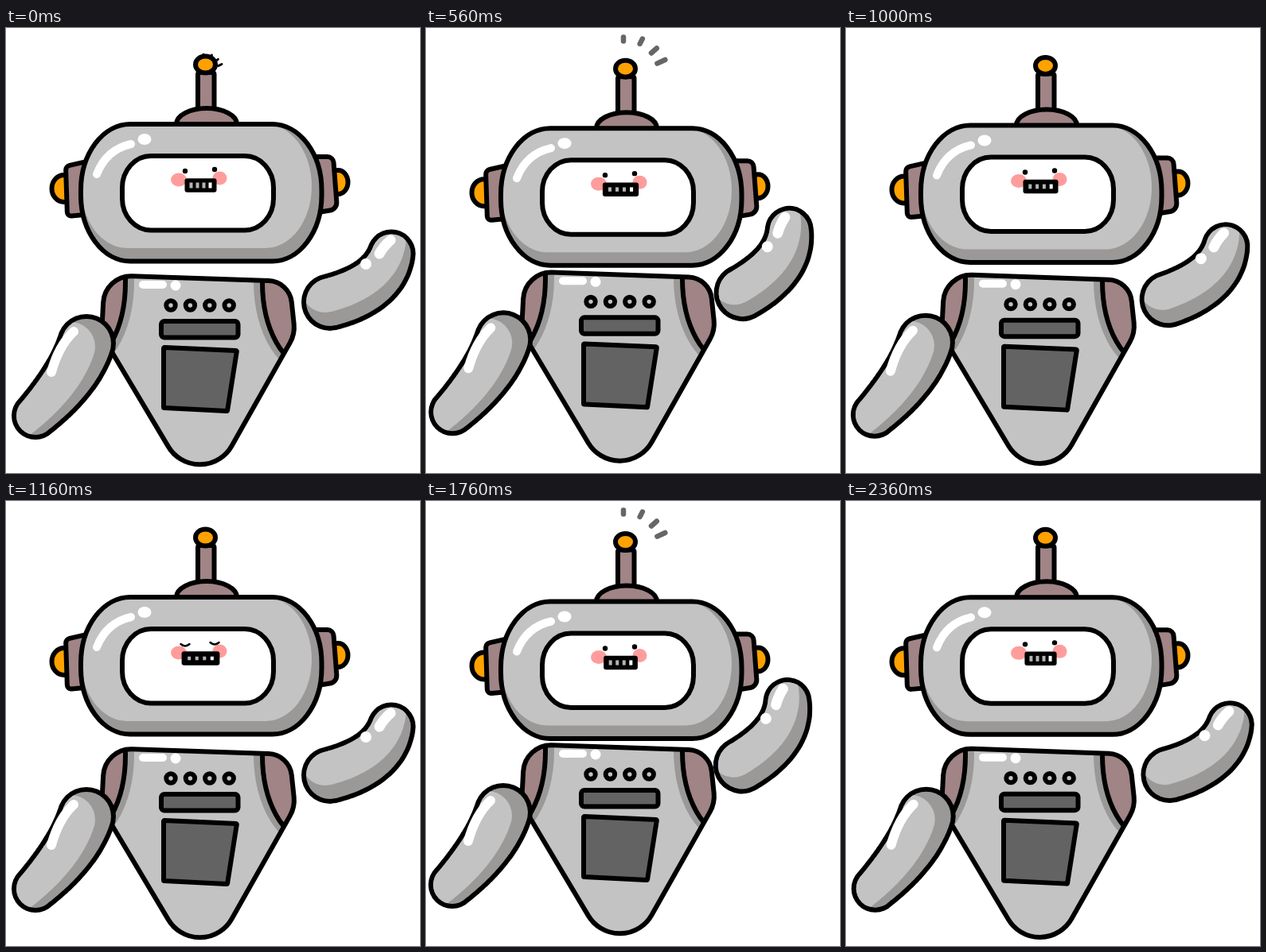
An HTML page with a canvas that plays this animation: 520x560 px, repeating every 2400 ms.

```html
<!DOCTYPE html>
<html lang="en">
<head>
<meta charset="utf-8">
<title>Waving robot</title>
<style>
html, body { margin: 0; width: 100%; height: 100%; overflow: hidden; background: #fff; }
canvas { display: block; }
</style>
</head>
<body>
<canvas id="stage" width="520" height="560"></canvas>
<script>
const ctx = document.getElementById('stage').getContext('2d');
const LOOP = 2400, STEP = 40;
const INK = '#000', LIGHT = '#c3c3c3', DARK = '#9b9898', MAUVE = '#a08486',
  ORANGE = '#ffa200', PANEL = '#636363', PINK = '#ff9c9c', WHITE = '#fff';

function oval(x, y, rx, ry = rx) {
  const path = new Path2D();
  path.ellipse(x, y, rx, ry, 0, 0, 2 * Math.PI);
  return path;
}

function box(x, y, w, h, rx, ry = rx) {
  const path = new Path2D();
  path.roundRect(x, y, w, h, { x: rx, y: ry });
  return path;
}

// Polygon of [x, y, corner radius].
function rounded(...corners) {
  const path = new Path2D(), [first] = corners, last = corners.at(-1);
  path.moveTo((first[0] + last[0]) / 2, (first[1] + last[1]) / 2);
  corners.forEach(([x, y, r], i) => {
    const [nx, ny] = corners[(i + 1) % corners.length];
    path.arcTo(x, y, nx, ny, r);
  });
  path.closePath();
  return path;
}

// Circles swept along a quadratic bend, narrowing towards the end.
function limb([ax, ay], [bx, by], [cx, cy], fromR, toR) {
  const path = new Path2D();
  for (let i = 0; i <= 60; i++) {
    const t = i / 60, u = 1 - t;
    const bend = (a, b, c) => u * u * a + 2 * u * t * b + t * t * c;
    path.addPath(oval(bend(ax, bx, cx), bend(ay, by, cy), fromR + (toR - fromR) * t * t));
  }
  return path;
}

function fill(path, color) {
  ctx.fillStyle = color;
  ctx.fill(path);
}

function line(path, width = 6, color = INK) {
  ctx.strokeStyle = color;
  ctx.lineWidth = width;
  ctx.stroke(path);
}

function part(path, color) {
  fill(path, color);
  line(path);
}

function group(draw) {
  ctx.save();
  draw();
  ctx.restore();
}

const shine = (d, width) => line(new Path2D(d), width, WHITE);

function drawRays(t) {
  const phase = t % 1200;
  const alpha = Math.min(1, (680 - phase) / 200);
  if (alpha <= 0) return;
  group(() => {
    const size = 0.44 + phase / 1000;
    ctx.globalAlpha = alpha;
    ctx.translate(248, 50);
    ctx.scale(size, size);
    for (let i = 0; i < 4; i++) {
      const angle = 0.65 * i - 0.06 * i * i, distance = 36 + 4 * i, half = 2.5 + i;
      const x = distance * Math.sin(angle), y = -distance * Math.cos(angle);
      const dx = half * Math.sin(0.8 * angle), dy = -half * Math.cos(0.8 * angle);
      line(new Path2D(`M${x - dx} ${y - dy}L${x + dx} ${y + dy}`), 6.5);
    }
  });
}

function drawMouth(t) {
  const open = (1 - Math.cos(t / 800 * 2 * Math.PI)) / 2;
  const w = 40 + 8 * open, h = 17.5, toothH = 7 - 2.5 * open;
  fill(box(244.5 - w / 2, 198 - h / 2, w, h, 3), INK);
  for (let i = 0; i < 4; i++) {
    ctx.fillStyle = i === 3 ? WHITE : '#b4b4b4';
    ctx.fillRect(244.5 + (i - 1.5) * w * 0.2 - 2, 198 - toothH / 2, 4, toothH);
  }
}

function drawFace(t) {
  const blinking = t >= 1100 && t < 1270;
  fill(oval(217, 191, 10, 8.5), PINK);
  fill(oval(268.5, 189, 9, 8.5), PINK);
  for (const [x, y] of [[225, 180], [262, 178]]) {
    if (blinking) line(new Path2D(`M${x - 5.5} ${y}q5.5 5 11 0`), 2.5);
    else fill(oval(x, y, 3.2), INK);
  }
  drawMouth(t);
}

function drawHead(t) {
  part(oval(73, 202, 15.5, 17), ORANGE);
  part(rounded([110, 166, 4], [75, 174, 6], [77, 237, 5], [110, 234, 4]), MAUVE);
  part(oval(417, 194, 12.5, 15), ORANGE);
  part(rounded([380, 162, 4], [411, 162, 8], [416, 228, 10], [380, 234, 4]), MAUVE);

  part(box(241, 56, 20.5, 46, 2), MAUVE);
  part(oval(250.5, 46, 12.5, 10.5), ORANGE);
  part(oval(252, 121, 38, 20), MAUVE);

  const shell = box(94, 121, 302.5, 172.5, 62, 83);
  fill(shell, DARK);
  group(() => {
    ctx.clip(shell);
    fill(box(94, 121, 290, 156, 58, 78), LIGHT);
  });
  line(shell);
  shine('M114 184Q126 153 157 146', 10);
  fill(oval(174, 140, 8.5, 7), WHITE);
  part(box(146, 161, 190, 93.5, 36, 40), WHITE);
  drawFace(t);
}

function drawBody() {
  const shell = rounded([124, 311, 35], [356, 319, 30], [363, 385, 40], [244.5, 595, 46], [120, 386, 30]);
  fill(shell, LIGHT);
  group(() => {
    ctx.clip(shell);
    for (const x of [90, 382]) {
      fill(oval(x, 320, 71, 116), DARK);
      part(oval(x, 320, 60, 107), MAUVE);
    }
  });
  line(shell);
  shine('M172 323H197', 10);
  fill(oval(213, 324, 6.5), WHITE);
  for (let i = 0; i < 4; i++) line(oval(207 + 24.4 * i, 349, 5.7), 6);
  part(box(195, 369, 96.5, 20.5, 4), PANEL);
  part(rounded([198, 402, 1], [290, 406, 1], [278, 482, 1], [198, 478, 1]), PANEL);
}

function drawArm(from, bend, to, fromR, toR, shadeX, shadeY) {
  const inner = limb(from, bend, to, fromR - 3, toR - 3);
  fill(limb(from, bend, to, fromR + 3, toR + 3), INK);
  fill(inner, DARK);
  ctx.save();
  ctx.clip(inner);
  ctx.translate(shadeX, shadeY);
  fill(inner, LIGHT);
  ctx.restore();
}

function drawLeftArm() {
  drawArm([101, 397], [87, 440], [37, 488], 34, 27, -20, 4);
  shine('M85 382Q66 400 57 433', 12);
}

function drawRightArm() {
  drawArm([407, 345], [473, 328], [484, 284], 33, 27.5, -6, -17);
  shine('M483 267Q474 275 469 284', 13);
  fill(oval(452, 297, 7), WHITE);
}

// Linear swing away from rest and back, twice per loop.
const swing = t => Math.min(t, Math.abs(t - 1160), LOOP - t) / 600;

function render(t) {
  const s = swing(t);
  ctx.fillStyle = WHITE;
  ctx.fillRect(0, 0, 520, 560);
  ctx.lineCap = ctx.lineJoin = 'round';
  drawRays(t);
  group(() => {
    ctx.translate(0, 5.5 * s);
    drawHead(t);
  });
  group(() => {
    ctx.translate(0, -5 * s);
    drawBody();
  });
  group(() => {
    ctx.translate(-4 * s, -5 * s);
    drawLeftArm();
  });
  group(() => {
    ctx.translate(357, 375);
    ctx.rotate(-16 * s * Math.PI / 180);
    ctx.translate(-357, -375);
    drawRightArm();
  });
}

let start;
function tick(now) {
  start ??= now;
  render(Math.floor((now - start) % LOOP / STEP) * STEP);
  requestAnimationFrame(tick);
}
render(0);
requestAnimationFrame(tick);
</script>
</body>
</html>
```
